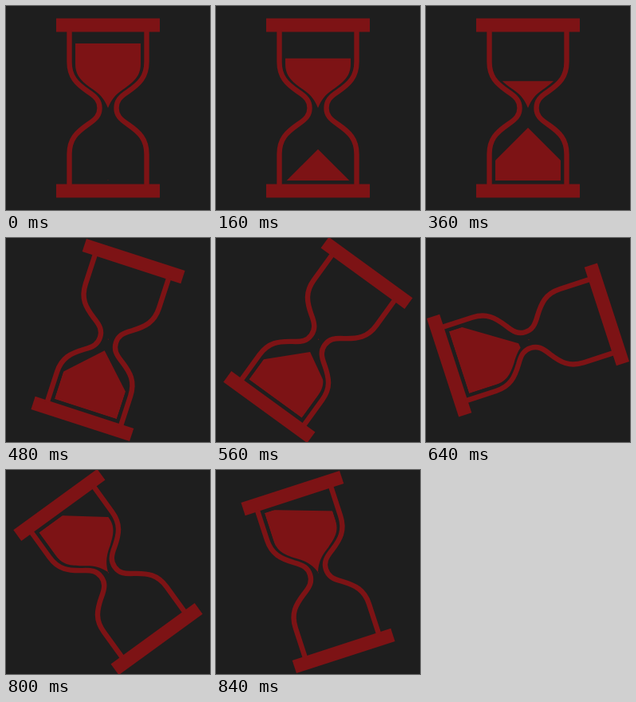
Animation, 256 px wide and 256 px high, one loop 0.88 s. Source, as an HTML page:

```html
<!DOCTYPE html>
<html lang="en">
<head>
<meta charset="utf-8">
<title>Hourglass</title>
<style>
  html, body { margin: 0; width: 100%; height: 100%; overflow: hidden; background: #1e1e1e; }
  svg { display: block; width: 100vw; height: 100vh; }
</style>
</head>
<body>
<svg viewBox="0 0 256 256">
  <defs>
    <path id="bulb" d="M87 219V184C87 168 95 162 106 153.5C116 147 123 141 128 128C133 141 140 147 150 153.5C161 162 169 168 169 184V219Z"/>
    <path id="wall" d="M79.5 30V70C79.5 89 88.5 97.5 103 107.5C113 114 117.5 119 117.5 128C117.5 137 113 142 103 148.5C88.5 158.5 79.5 167 79.5 186V226"/>
    <clipPath id="inside"><use href="#bulb"/></clipPath>
  </defs>
  <rect width="256" height="256" fill="#1e1e1e"/>
  <g id="glass" fill="#7d1315">
    <rect x="63" y="15.5" width="130" height="17"/>
    <rect x="63" y="223.5" width="130" height="17"/>
    <g fill="none" stroke="#7d1315" stroke-width="6.4">
      <use href="#wall"/>
      <use href="#wall" transform="matrix(-1 0 0 1 256 0)"/>
    </g>
    <g transform="matrix(1 0 0 -1 0 256)" clip-path="url(#inside)"><polygon id="top"/></g>
    <g clip-path="url(#inside)"><polygon id="pile"/></g>
  </g>
</svg>
<script>
const LOOP = 880, STEP = 40;
const POUR = 11;        // steps until the upper bulb is empty
const TURN = 18;        // degrees per step
const REPOSE = 45;      // slope of a resting pile
const FULL = 209;       // surface of the settled sand, before it pours
const CX = 128, CY = 140, FAR = 900;

const el = id => document.getElementById(id);
const glass = el('glass'), topSand = el('top'), pile = el('pile');

// grains spread evenly through one bulb, relative to the resting apex
const grains = [];
const outline = new Path2D(el('bulb').getAttribute('d'));
const pen = document.createElement('canvas').getContext('2d');
for (let x = 87.5; x < 169; x++) {
  for (let y = 128 + (x * 0.618) % 1; y < 219; y++) {
    if (pen.isPointInPath(outline, x, y)) grains.push([x - CX, y - CY]);
  }
}
const total = grains.filter(g => g[1] < FULL - CY).length;

// sand under two faces sloping down left and right, holding a share of all grains
function sand(left, right, share) {
  const a = left * Math.PI / 180, b = right * Math.PI / 180;
  const [ax, ay, bx, by] = [Math.sin(a), Math.cos(a), -Math.sin(b), Math.cos(b)];
  const depths = grains.map(([x, y]) => Math.min(x * ax + y * ay, x * bx + y * by));
  depths.sort((p, q) => q - p);
  const depth = depths[Math.round(share * total)];
  const k = depth / (1 + ax * bx + ay * by);
  const x = CX + k * (ax + bx), y = CY + k * (ay + by);
  const at = (dx, dy) => [x + FAR * dx, y + FAR * dy];
  return [at(0, 0), at(by, -bx), at(ax + bx, ay + by), at(-ay, ax)].join(' ');
}

function draw(step) {
  const poured = Math.max(0, Math.min(1, (step - 0.5) / (POUR - 0.5)));
  const turn = Math.max(0, step - POUR);
  const angle = turn * TURN;
  // the left face turns with the glass, then slides towards level
  const tilt = Math.min(angle - REPOSE, 16 * 0.58 ** (turn - 4));
  // the right face never gets steeper than 65 degrees
  const right = Math.min(REPOSE, 65 - angle);

  glass.setAttribute('transform', `rotate(${angle} 128 128)`);
  topSand.setAttribute('points', sand(180, -180, 1 - poured));
  pile.setAttribute('points', sand(angle - tilt, right, poured));
}

const start = performance.now();
let shown = -1;
function tick() {
  let step = Math.floor(((performance.now() - start) % LOOP) / STEP);
  if (step > POUR + 1) step--;   // the first tilt is held twice as long
  if (step !== shown) draw(shown = step);
  requestAnimationFrame(tick);
}
tick();
</script>
</body>
</html>
```
